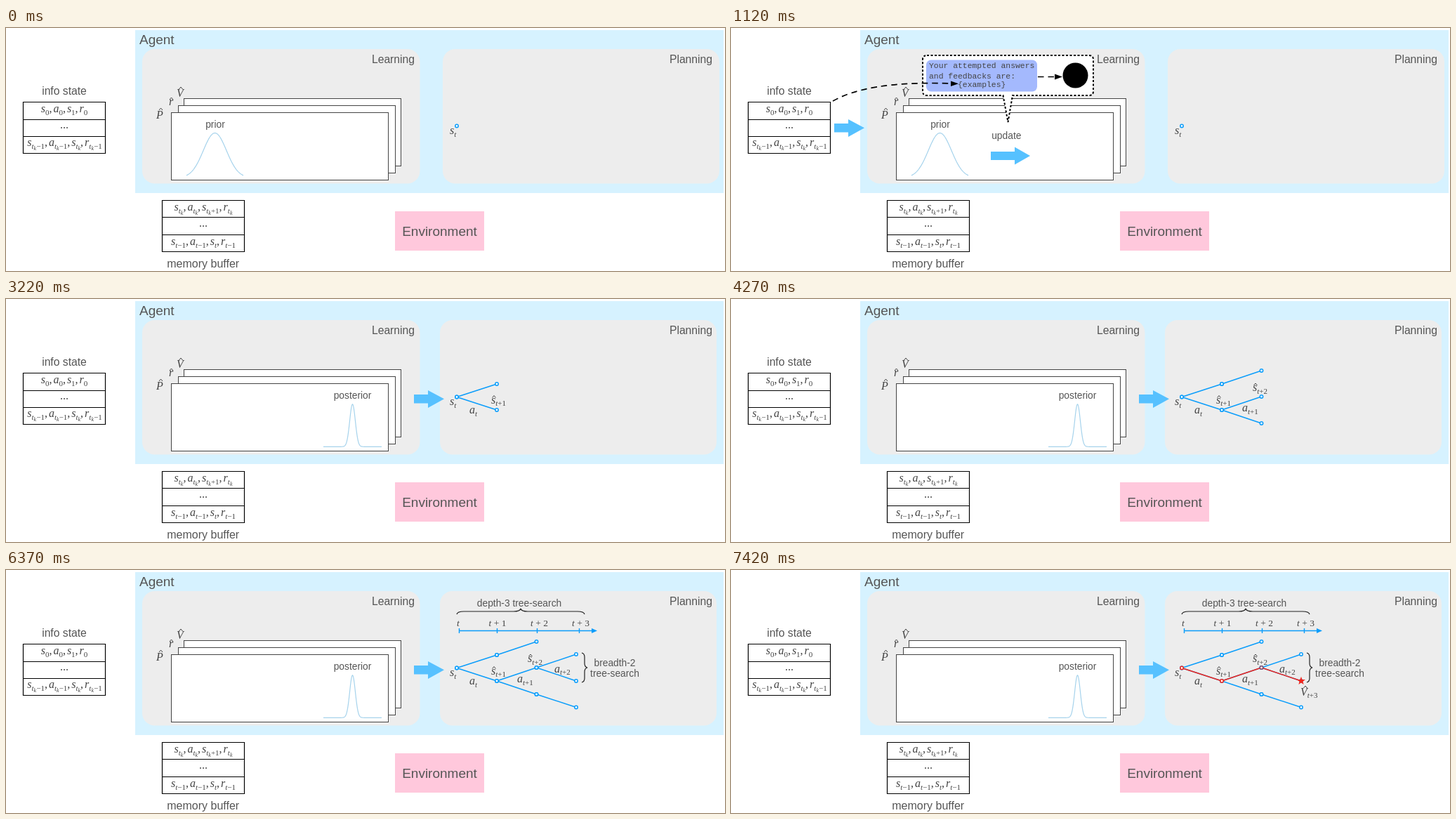
An HTML page for the animation above (8 s loop, 1024 by 346 pixels).

```html
<!DOCTYPE html>
<html lang="en">
<head>
<meta charset="utf-8">
<title>Agent learning and planning</title>
<style>
html, body { margin: 0; width: 100%; height: 100%; overflow: hidden; background: #fff; }
svg { display: block; width: 100vw; height: 100vh; }
text { font-family: "Liberation Sans", Arial, sans-serif; font-size: 13.8px; fill: #555; }
.mid { text-anchor: middle; }
.big { font-size: 19px; }
.head { font-size: 15.7px; }
.code { font: 11.4px "Liberation Mono", monospace; fill: #444; white-space: pre; }
.math { font: italic 16px "Liberation Serif", "Times New Roman", serif; fill: #444; }
.math.small { font-size: 13.5px; }
.up { font-style: normal; }
.sub1 { font-size: 11px; }
.sub2 { font-size: 8px; }
.panel { fill: #ededed; }
.sheet { fill: #fff; stroke: #444; }
.table { fill: none; stroke: #000; stroke-width: 1.2; }
.curve { fill: none; stroke: #a6d3ec; stroke-width: 1.2; }
.arrow { fill: #56c1ff; }
.ink { fill: none; stroke: #000; stroke-width: 1.7; }
.dash { stroke-dasharray: 8.5 6; }
.hat { fill: none; stroke: #444; stroke-width: 1; }
.brace { fill: none; stroke: #222; stroke-width: 1.2; }
.edge { fill: none; stroke: #0a9dfb; stroke-width: 1.4; }
.node { fill: #fff; stroke: #0a9dfb; stroke-width: 1.5; }
.red { stroke: #f3261c; }

/* visibility windows within the 8 s loop */
.prior, .update, .posterior, .plan, .depth2, .depth3, .axis, .best, .panel.shift {
  animation: 8s step-end infinite;
}
.prior { animation-name: prior; }
.update { animation-name: update; }
.posterior { animation-name: posterior; }
.plan { animation-name: plan; }
.depth2 { animation-name: depth2; }
.depth3 { animation-name: depth3; }
.axis { animation-name: axis; }
.best { animation-name: best; }
.panel.shift { animation-name: shift; }
@keyframes prior { 0% { visibility: visible } 40.25%, 100% { visibility: hidden } }
@keyframes update { 0%, 40.25%, 100% { visibility: hidden } 14% { visibility: visible } }
@keyframes posterior { 0% { visibility: hidden } 27.125%, 100% { visibility: visible } }
@keyframes plan { 0% { visibility: hidden } 40.25%, 100% { visibility: visible } }
@keyframes depth2 { 0% { visibility: hidden } 53.375%, 100% { visibility: visible } }
@keyframes depth3 { 0% { visibility: hidden } 66.5%, 100% { visibility: visible } }
@keyframes axis { 0% { visibility: hidden } 79.625%, 100% { visibility: visible } }
@keyframes best { 0% { visibility: hidden } 92.75%, 100% { visibility: visible } }
@keyframes shift { 0% { transform: none } 40.25%, 100% { transform: translateX(-4px) } }
</style>
</head>
<body>
<svg viewBox="0 0 1024 346" preserveAspectRatio="none">
  <rect x="184" y="3" width="838" height="232" fill="#d6f2ff"/>
  <rect class="panel" x="194" y="30" width="395.5" height="191.5" rx="18"/>
  <rect class="panel shift" x="622" y="30" width="394" height="191.5" rx="18"/>
  <text class="big" x="190" y="23">Agent</text>
  <text class="head" x="582" y="50" text-anchor="end">Learning</text>
  <text class="head" x="1006" y="50" text-anchor="end">Planning</text>

  <text class="head mid" x="83" y="95">info state</text>
  <path class="table" d="M24.5 105.5h117v73h-117zM24.5 130.5h117M24.5 154.5h117"/>
  <text class="head mid" style="font-size:16px" x="280.7" y="341">memory buffer</text>
  <path class="table" d="M222.5 245.5h117v73h-117zM222.5 269.5h117M222.5 294.5h117"/>

  <rect x="554" y="261" width="127" height="56" fill="#ffc8dc"/>
  <text class="big mid" x="617.5" y="296">Environment</text>

  <rect class="sheet" x="253.5" y="100.5" width="309" height="96"/>
  <rect class="sheet" x="245.5" y="110.5" width="309" height="96"/>
  <rect class="sheet" x="235.5" y="120.5" width="309" height="96"/>

  <g id="base"></g>

  <g class="prior">
    <text class="mid" x="298" y="141.5">prior</text>
    <path class="curve" id="wide"/>
  </g>

  <g class="update">
    <path class="arrow" d="M147 136h20v-6l23 12.3l-23 12.7v-6.500h-20z"/>
    <path class="arrow" d="M370 176h34v-6.500l22 12.500l-22 12.500v-6.500h-34z"/>
    <text class="mid" x="392.300" y="157.500">update</text>
    <path d="M279 39H510Q516 39 516 45V90Q516 96 510 96H401L394.500 134L387.500 96H279Q273 96 273 90V45Q273 39 279 39Z"
      fill="#fff" stroke="#000" stroke-width="2" stroke-dasharray="3 2.500"/>
    <rect x="278" y="45.500" width="158" height="45" rx="7" fill="#a4b9fd"/>
    <text class="code" x="282" y="57">Your attempted answers</text>
    <text class="code" x="282" y="72">and feedbacks are:</text>
    <text class="code" x="323" y="84">{examples}</text>
    <path class="ink dash" d="M145 104C175 87 225 76 314 79"/>
    <path d="M313 75.500L324 79.300L313 83z"/>
    <path class="ink dash" d="M437 69.500H462"/>
    <path d="M461 65.500L472 69.500L461 73.500z"/>
    <circle cx="490.500" cy="67.500" r="18"/>
  </g>

  <g class="posterior">
    <text class="mid" x="493.500" y="141.500">posterior</text>
    <path class="curve" id="narrow"/>
  </g>

  <g class="plan" id="plan">
    <path class="arrow" d="M581 136h20v-6l23 12.300l-23 12.700v-6.500h-20z"/>
  </g>
  <g class="depth2" id="depth2"></g>
  <g class="depth3" id="depth3"></g>

  <g class="axis" id="axis">
    <path class="edge" d="M645 86.500H836M645.500 83v7M699.500 83v7M756.500 83v7M816.500 83v7"/>
    <path d="M834 83L842 86.500L834 90z" fill="#0a9dfb"/>
    <text class="mid" x="731" y="52">depth-3 tree-search</text>
    <path class="brace" d="M642 63Q643 59 652 59H723Q732 59 733 55Q734 59 743 59H814Q823 59 824 63"/>
    <path class="brace" d="M820 118Q824 119 824 124V133Q824 138 828 139Q824 140 824 145V154Q824 159 820 160"/>
    <text class="mid" x="867" y="137">breadth-2</text>
    <text class="mid" x="867" y="152">tree-search</text>
  </g>
  <g class="best" id="best"></g>
</svg>
<script>
const byId = id => document.getElementById(id);

function add(parent, tag, attrs, text = "") {
  const el = document.createElementNS("http://www.w3.org/2000/svg", tag);
  for (const key in attrs) el.setAttribute(key, attrs[key]);
  el.textContent = text;
  parent.append(el);
  return el;
}

// "<" opens a subscript, ">" closes it
function math(parent, x, y, src, cls = "") {
  const text = add(parent, "text", { x, y, class: "math " + cls });
  const drop = [0, 3.5, 5.5];
  let level = 0, shown = 0, gap = 0;
  for (const ch of src) {
    if (ch === "<") level++;
    else if (ch === ">") level--;
    else {
      const style = /[a-zV]/i.test(ch) ? "" : "up ";
      add(text, "tspan", {
        class: style + (level ? "sub" + level : ""),
        dx: gap,
        dy: drop[level] - drop[shown]
      }, ch);
      shown = level;
      gap = ch === "," ? 2 : 0;
    }
  }
}

function hat(parent, x, y) {
  add(parent, "path", { class: "hat", d: `M${x - 2.5} ${y + 2}l2.5 -3l2.5 3` });
}

function bell(id, center, floor, height, sigma, half) {
  const points = [];
  for (let dx = -half; dx <= half; dx += 0.5) {
    const y = floor - height * Math.exp(-dx * dx / (2 * sigma * sigma));
    points.push(`${center + dx} ${y.toFixed(2)}`);
  }
  byId(id).setAttribute("d", "M" + points.join("L"));
}

const nodes = {
  A: [642, 139.5], B: [699, 121], C: [699, 158], D: [755.5, 102], E: [755.5, 139],
  F: [755.5, 177], G: [812, 120], H: [812, 158], I: [812, 195.5]
};

function tree(parent, edges, dots, cls = "") {
  for (const [a, b] of edges)
    add(parent, "path", { class: "edge " + cls, d: `M${nodes[a]}L${nodes[b]}` });
  for (const n of dots)
    add(parent, "circle", { class: "node " + cls, cx: nodes[n][0], cy: nodes[n][1], r: 2.2 });
}

const [base, plan, depth2, depth3, axis, best] =
  ["base", "plan", "depth2", "depth3", "axis", "best"].map(byId);

math(base, 83, 120, "s<0>,a<0>,s<1>,r<0>", "mid");
math(base, 83, 143, "...", "mid");
math(base, 83.5, 168, "s<t<k>−1>,a<t<k>−1>,s<t<k>>,r<t<k>−1>", "mid");
math(base, 281, 260, "s<t<k>>,a<t<k>>,s<t<k>+1>,r<t<k>>", "mid");
math(base, 281, 283, "...", "mid");
math(base, 281, 309, "s<t−1>,a<t−1>,s<t>,r<t−1>", "mid");
math(base, 214, 129, "P");
hat(base, 220.5, 115);
math(base, 232, 110, "r");
hat(base, 235.5, 100);
math(base, 243, 98, "V");
hat(base, 249, 85);
math(base, 632, 151, "s<t>");
tree(base, [], "A");

bell("wide", 297.5, 213, 63.5, 16.5, 40.5);
bell("narrow", 493.5, 210.3, 60.5, 4, 41.5);

tree(plan, ["AB", "AC"], "ABC");
math(plan, 660, 163, "a<t>");
math(plan, 691, 148.5, "s<t+1>");
hat(plan, 695, 138.5);

tree(depth2, ["BD", "CE", "CF"], "BCDEF");
math(depth2, 728, 160, "a<t+1>");
math(depth2, 743, 131, "s<t+2>");
hat(depth2, 747, 121);

tree(depth3, ["EG", "EH", "FI"], "EFGHI");
math(depth3, 781, 145.5, "a<t+2>");

["t", "t + 1", "t + 2", "t + 3"].forEach((label, i) =>
  math(axis, [644, 700, 759.5, 818.5][i], 80, label, "small mid"));

tree(best, ["AC", "CE", "EH"], "ACE", "red");
best.querySelectorAll("circle")[2].style.stroke = "#8a4a68";
const star = Array.from({ length: 10 }, (_, i) => {
  const r = i % 2 ? 2.5 : 6.3, a = (i / 5 - 0.5) * Math.PI;
  return [nodes.H[0] + r * Math.cos(a), nodes.H[1] + r * Math.sin(a)];
});
add(best, "polygon", { points: star.join(" "), fill: "#f3261c" });
math(best, 811, 178.5, "V<t+3>");
hat(best, 818, 166);
</script>
</body>
</html>
```
